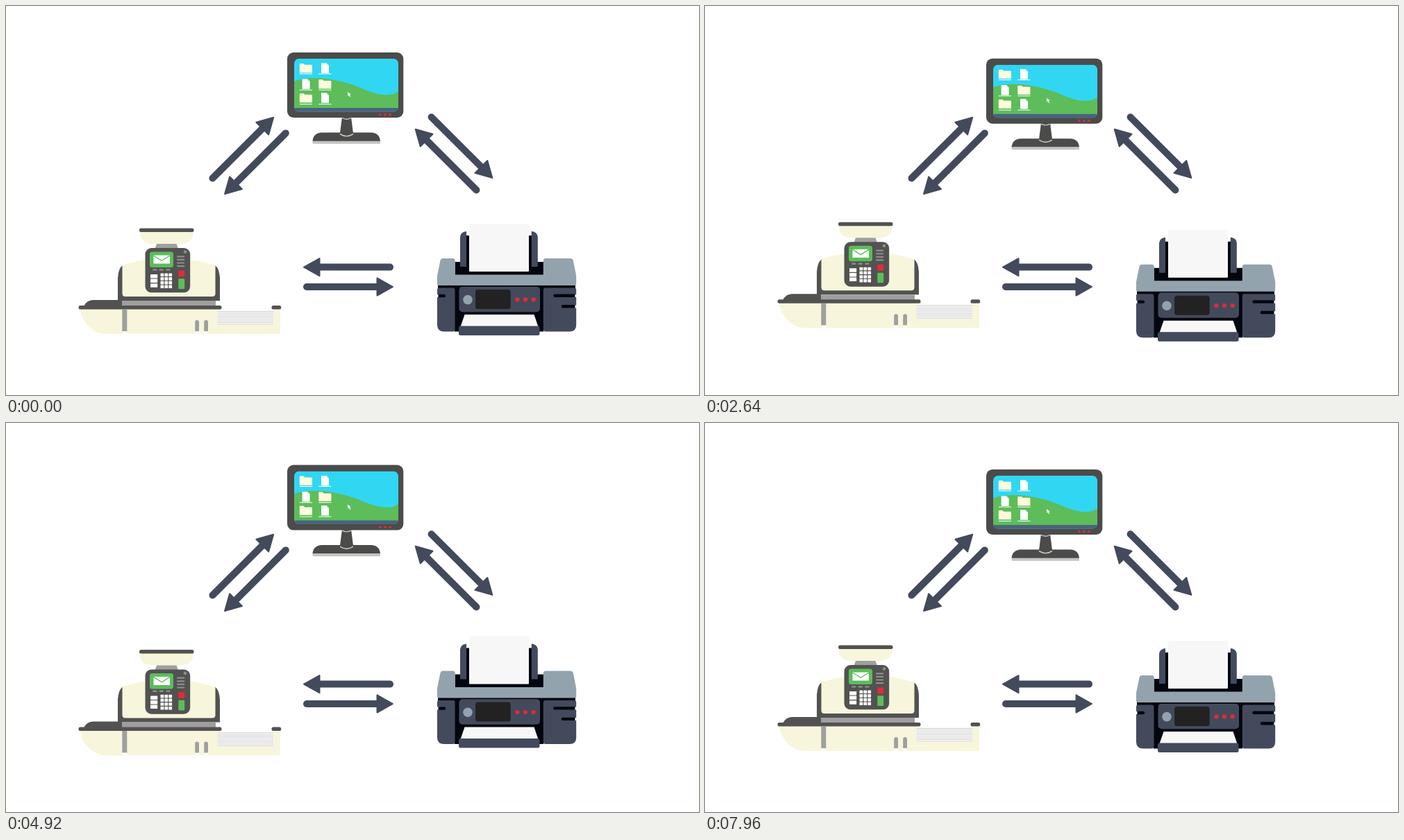
Write an HTML page that moves like this. It is 998 by 561 pixels and loops after 8 s.

```html
<!DOCTYPE html>
<html lang="en">
<head>
<meta charset="utf-8">
<title>Office devices</title>
<style>
html, body { margin: 0; width: 100%; height: 100%; overflow: hidden; background: #fff; }
svg { display: block; width: 100%; height: 100%; }
.slate { fill: #434a5c; }
.dark { fill: #525251; }
.cream { fill: #f7f6dc; }
.grey { fill: #9f9f9f; }
.black { fill: #03060f; }
.steel { fill: #93a3ad; }
.paper { fill: #f7f7f7; }
.white { fill: #fff; }
.green { fill: #5cbd5a; }
.red { fill: #e32a3a; }
.frame { fill: #4b4b4a; }
</style>
</head>
<body>
<svg viewBox="0 0 998 561" preserveAspectRatio="none">
  <defs>
    <clipPath id="glass"><rect x="415" y="76" width="150" height="76.5" rx="7"/></clipPath>
    <g id="folder">
      <path fill="#fffbdc" d="M0 1.2Q0 0 1.2 0H5.5L7.5 1.8H17Q18.2 1.8 18.2 3V13.2H0Z"/>
    </g>
    <g id="sheet">
      <path class="white" d="M0 0H7.5L11 3.5V14.5H0Z"/>
      <path fill="#dfe6e4" d="M7.5 0V3.5H11Z"/>
    </g>
    <g id="arrow">
      <path d="M0 0H104" stroke="#434a5c" stroke-width="10" stroke-linecap="round"/>
      <path class="slate" d="M124 0L101.5 -12.6V12.6Z" stroke="#434a5c" stroke-width="2" stroke-linejoin="round"/>
    </g>
  </defs>

  <g id="arrows"></g>

  <g id="monitor">
    <path class="frame" d="M484 160H497L500.5 187Q490 191 480.5 187Z"/>
    <path class="frame" d="M441.5 195Q442.5 183 455 182.5H526Q538 183 539 195Z"/>
    <rect x="441.5" y="194.7" width="97.5" height="4" rx="1" fill="#c4c4c4"/>
    <path d="M481 184.5Q490.5 191 500 184.5" fill="none" stroke="#c4c4c4" stroke-width="1.6"/>
    <path d="M483.5 161Q490.5 165.5 497.5 161" fill="none" stroke="#c4c4c4" stroke-width="1.4"/>
    <rect class="frame" x="405" y="67" width="167.3" height="94" rx="9"/>
    <g clip-path="url(#glass)">
      <path fill="#31d6f2" d="M415 76H565V153H415Z"/>
      <path class="green" d="M415 108.5C440 100 478 104 513 119C538 130 556 131 566 122.500V148H415Z"/>
      <path fill="#4b637d" d="M415 147H565V153H415Z"/>
    </g>
    <g id="icons"></g>
    <path class="white" d="M491.8 123.800L496.800 127.500L494.900 128L496.400 130.600L495.200 131.300L493.800 128.700L492.500 130Z"/>
    <g class="red">
      <circle cx="539" cy="156.600" r="1.800"/><circle cx="546" cy="156.600" r="1.800"/><circle cx="553" cy="156.600" r="1.800"/>
    </g>
  </g>

  <g id="franker">
    <path class="cream" d="M193 325H269.500V331Q266 343 250 343H212Q196 343 193 331Z"/>
    <rect class="dark" x="192" y="320.500" width="78.500" height="5.500" rx="2.500"/>
    <path class="grey" d="M217 343H245.500L248 350H214.500Z"/>
    <path class="dark" d="M161 425V392Q162 378 168 374H301Q307 378 308 392V425Z"/>
    <path class="cream" d="M167.500 373.500Q185 368 201 366H265Q284 368.500 301.500 374V414.500Q301.500 419 297 419H172Q167.500 419 167.500 414.500Z"/>
    <rect class="dark" x="200.500" y="349" width="64.700" height="64.300" rx="9"/>
    <rect class="green" x="207" y="354.500" width="34" height="22.500" rx="3.500"/>
    <rect class="white" x="212.500" y="359.500" width="23.500" height="12"/>
    <path d="M212.500 360L224.200 367.300L236 360" fill="none" stroke="#5cbd5a" stroke-width="1.300"/>
    <circle cx="258" cy="354.500" r="2.300" fill="#8d8d8c"/>
    <g id="keys"></g>
    <rect class="red" x="248.300" y="381.500" width="8.900" height="9" rx="1.300"/>
    <rect class="green" x="248.300" y="393.300" width="8.900" height="14.700" rx="1.300"/>
    <rect class="grey" x="166.500" y="425" width="135.500" height="7.500"/>
    <path class="dark" d="M112 433Q116 424.500 125 424H167V433Z"/>
    <path class="cream" d="M106.500 436H395V470Q395 473 392 473H145C126 473 109 457 106.500 436Z"/>
    <path class="white" d="M309.500 431H396V438.500H309.500Z"/>
    <rect class="dark" x="104.500" y="432" width="206" height="5.500" rx="2.500"/>
    <rect class="dark" x="382.500" y="432" width="13.700" height="5.500" rx="2.500"/>
    <path class="grey" d="M167.300 437.500H174.300V469H167.300Z"/>
    <path class="grey" d="M272.200 469V456Q272.200 453 275.100 453Q278 453 278 456V469ZM285.200 469V456Q285.200 453 288.100 453Q291 453 291 456V469Z"/>
    <path class="white" d="M167.800 469.500H173.800V473.500H167.800Z"/>
    <path class="white" d="M272.700 469.500H277.500V473.500H272.700ZM285.700 469.500H290.500V473.500H285.700Z"/>
    <rect class="white" x="304.500" y="438.700" width="80.500" height="21"/>
    <g id="stack"></g>
  </g>

  <g id="printer">
    <path class="black" d="M662.500 331H757.500V369H774V389H646.500V369H662.500Z"/>
    <path class="slate" d="M654 376V333Q655 325.500 663 325V376ZM765.800 376V333Q764.800 325.500 756.800 325V376Z"/>
    <rect class="paper" x="667" y="314" width="86" height="69" rx="1"/>
    <path class="black" d="M622 402H820V409H774V469.500H646V409H622Z"/>
    <path class="steel" d="M621 389L625.500 367Q626.300 364 629.500 364H643.500Q646.800 364 646.800 367.500V387.500H773.800V367.500Q773.800 364 777 364H812.500Q816 364 816.800 367L821.200 389V401Q821.200 403 819 403H623Q621 403 621 401Z"/>
    <path class="slate" d="M621 409Q621 406.500 623.500 406.500H643.500Q646.500 406.500 646.500 409.500V466.500Q646.500 469.500 643.500 469.500H631Q621 469.500 621 460Z"/>
    <path class="slate" d="M821.200 409Q821.200 406.500 818.700 406.500H776.800Q773.800 406.500 773.800 409.500V466.500Q773.800 469.500 776.800 469.500H811.500Q821.200 469.500 821.200 460Z"/>
    <path class="white" d="M620 416H624V420H620ZM818.500 416H823V420H818.500ZM818.500 431.500H823V435.500H818.500Z"/>
    <path class="black" d="M622.500 415.800H631Q633.200 415.800 633.200 418T631 420.200H622.500ZM819.500 415.600H790.500Q788.300 415.600 788.300 417.800T790.500 420H819.500ZM819.500 431.100H802Q799.700 431.100 799.700 433.300T802 435.500H819.500Z"/>
    <rect class="slate" x="652.500" y="404.700" width="116.500" height="36.500" rx="5"/>
    <circle class="steel" cx="665" cy="423.600" r="6.800"/>
    <rect x="676" y="409" width="50.700" height="28" rx="3.500" fill="#222"/>
    <g class="red">
      <circle cx="736.500" cy="423.400" r="3.100"/><circle cx="748" cy="423.400" r="3.100"/><circle cx="759.700" cy="423.400" r="3.100"/>
    </g>
    <path class="paper" d="M660.500 445H760.500L766.300 462H654.700Z"/>
    <rect class="slate" x="652" y="461.500" width="116.500" height="13.500" rx="2.500"/>
  </g>
</svg>
<script>
const $ = id => document.getElementById(id);
const fill = (id, parts) => { $(id).innerHTML = parts.join(''); };
const bar = (x, y, w, h, color, r = 0) =>
  `<rect x="${x}" y="${y}" width="${w}" height="${h}" rx="${r}" fill="${color}"/>`;
const range = n => [...Array(n).keys()];

// tail x, tail y, heading in degrees
const arrows = [
  [297.5, 248.4, -45], [402.8, 183.4, 135],
  [612.6, 160.2, 45], [677.4, 265.4, -135],
  [553, 376.6, 180], [433, 405, 0]
];
fill('arrows', arrows.map(([x, y, a]) =>
  `<use href="#arrow" transform="translate(${x} ${y}) rotate(${a})"/>`));

const rows = [[83, 97.4, 'fs'], [106, 120.6, 'sf'], [126, 141, 'fs']];
fill('icons', rows.flatMap(([y, line, kinds]) => [...kinds].map((kind, i) => {
  const x = 422.8 + i * 27.4;
  const icon = kind === 'f'
    ? `<use href="#folder" x="${x}" y="${y}"/>`
    : `<use href="#sheet" x="${x + 3.8}" y="${y - 0.7}"/>`;
  return icon + bar(x, line, 18.3, 1, '#fff');
})));

fill('keys', [
  ...range(4).map(i => bar(246, 360.2 + i * 4.6, 11.3, 2.2, '#8d8d8c', 1)),
  ...range(3).map(i => bar(211 + i * 9.6, 379.2, 6.5, 2.4, '#8d8d8c', 1.2)),
  ...range(3).map(i => bar(208, 387 + i * 6.6, 10.2, 5.5, '#fff', 0.6)),
  ...range(12).map(i => bar(222.5 + i % 3 * 5.9, 385.4 + (i / 3 | 0) * 5.7, 4.8, 4.6, '#fff', 0.6))
]);

fill('stack', range(9).map(i => bar(304.5, 440 + i * 2.3, 80.5, 0.9, '#c9c9c9')));

// time in ms, vertical offset
const steps = [[0, 0], [2000, 10], [6000, -10], [8000, 0]];
const ease = u => u * u * (3 - 2 * u);

function offset(t) {
  const i = steps.findIndex(s => t < s[0]);
  const [t0, a] = steps[i - 1], [t1, b] = steps[i];
  return a + (b - a) * ease((t - t0) / (t1 - t0));
}

const move = (id, y) => $(id).setAttribute('transform', `translate(0 ${y.toFixed(3)})`);
const start = performance.now();

function draw() {
  const t = (performance.now() - start) % 8000;
  const y = offset(Math.floor(t / 40) * 40);
  move('monitor', y);
  move('printer', y);
  move('franker', -y);
  requestAnimationFrame(draw);
}
draw();
</script>
</body>
</html>
```
